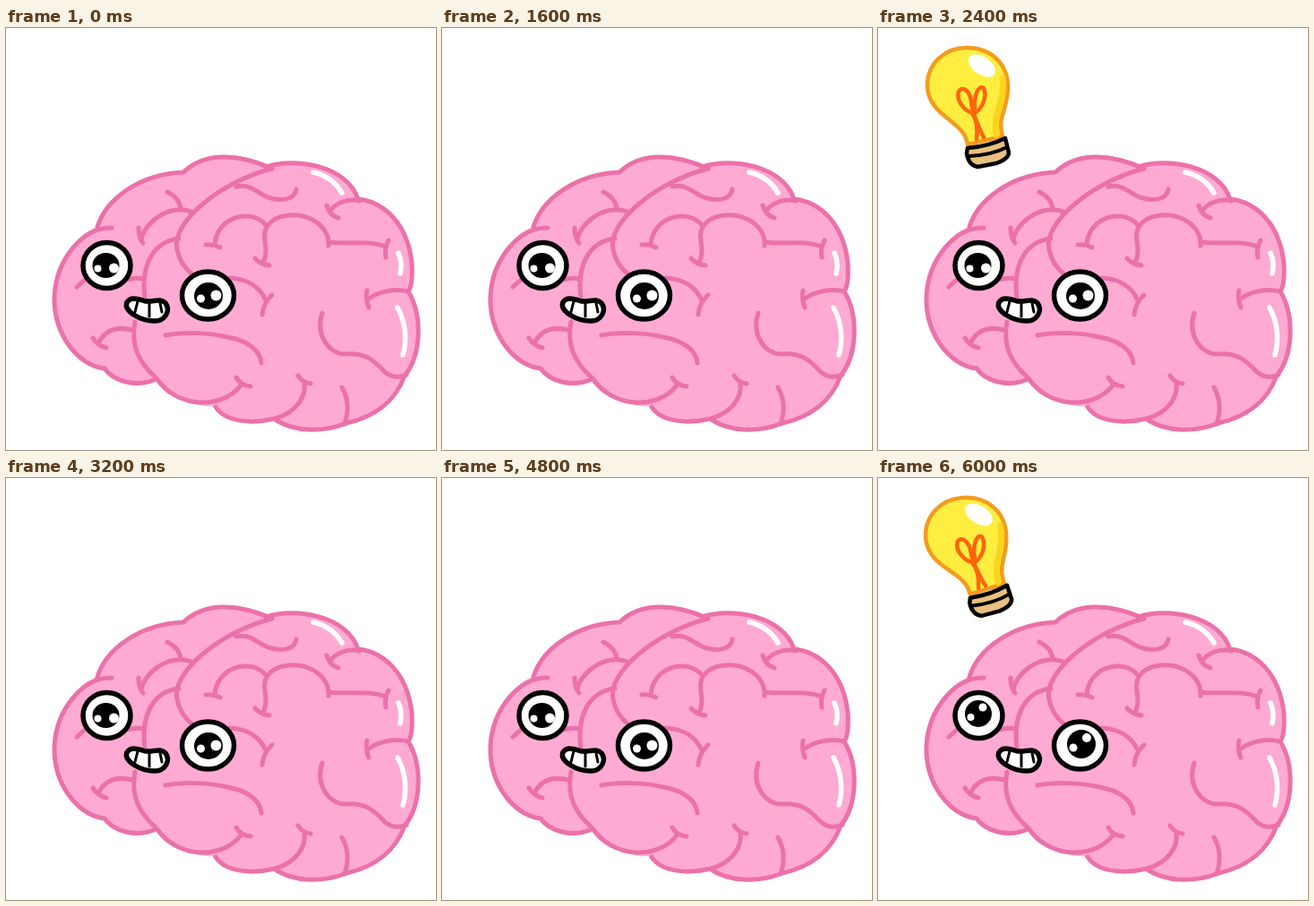
Animation, 480 px wide and 471 px high, one loop 6.4 s. Source, as an HTML page:

```html
<!DOCTYPE html>
<html lang="en">
<head>
<meta charset="utf-8">
<title>Bright idea</title>
<style>
html, body { margin: 0; width: 100%; height: 100%; overflow: hidden; background: #fff; }
svg { display: block; width: 480px; height: 471px; }
path, ellipse { stroke-linecap: round; stroke-linejoin: round; }
.skin { fill: #ffaad3; stroke: none; }
.fold { fill: none; stroke: #eb71a9; stroke-width: 5; }
.shine { fill: none; stroke: #fff; stroke-width: 5.5; }
.ink { fill: #fff; stroke: #000; stroke-width: 5.5; }
.tooth { fill: none; stroke: #000; stroke-width: 3; }
.glass { fill: #ffee3f; stroke: #f49b1e; stroke-width: 4.5; }
.shade { fill: none; stroke: #fdd51f; stroke-width: 7; }
.wire { fill: none; stroke: #ff650b; stroke-width: 4.5; }
.cap { fill: #e9c080; stroke: #000; stroke-width: 4.5; }
</style>
</head>
<body>
<svg viewBox="0 0 480 471">
  <g id="brain">
    <path class="skin" d="M102 222C112 190 150 163 198 161C220 140 255 136 297 154C325 143 380 153 393 191C422 194 448 218 453 262C454 280 453 289 449 294C465 320 464 365 445 388C435 416 412 434 380 441C350 453 320 449 300 437C270 443 245 440 234 422C205 424 184 408 168 391C145 402 120 393 110 380C80 375 52 340 54 300C57 255 85 226 102 222Z"/>
    <g class="fold">
      <path d="M102 222C112 190 150 163 198 161C220 140 255 138 297 157"/>
      <path d="M118 223C86 222 56 258 54 300C53 342 80 376 110 380C120 394 145 402 167 392"/>
      <path d="M297 157C238 172 184 218 191 247C194 261 200 268 208 275"/>
      <path d="M193 235C166 238 150 262 155 302"/>
      <path d="M144 328C139 355 148 373 168 391C190 424 240 427 262 399M257 390Q262 399 273 400"/>
      <path d="M290 155C322 144 380 153 393 191C422 194 448 218 453 262C454 280 453 289 449 294C465 320 464 365 445 388C435 416 412 434 380 441C350 453 320 449 302 438"/>
      <path d="M234 423C245 440 275 442 300 436C325 429 335 411 333 396M326 388Q331 396 340 397"/>
      <path d="M375 401C383 415 382 430 378 442"/>
      <path d="M353 318C345 342 360 364 379 364C400 362 410 370 422 383C429 390 439 391 447 387"/>
      <path d="M257 177C275 173 282 187 296 190C310 194 323 190 324 180"/>
      <path d="M358 198Q361 209 371 212M362 204C368 195 382 190 395 193"/>
      <path d="M233 241C235 222 250 210 268 210C278 210 285 214 290 220M223 242Q231 241 239 245M278 257Q284 264 294 265"/>
      <path d="M287 262C295 245 284 235 291 222C300 207 325 206 340 213C355 220 361 232 360 243M360 239C385 242 402 236 424 244M427 237Q422 246 424 256"/>
      <path d="M405 302C415 295 432 290 449 294M403 293Q401 302 405 312"/>
      <path d="M180 183Q194 190 195 202M151 237C153 219 180 196 207 205M148 223Q148 234 153 240"/>
      <path d="M104 350C112 336 125 333 141 337M97 346Q103 355 112 357"/>
      <path d="M79 289L88 281M136 281Q145 278 153 280"/>
      <path d="M250 279C268 280 283 288 290 304M297 298Q287 307 286 320"/>
      <path d="M178 343C198 339 228 340 247 345C270 349 284 360 285 374"/>
    </g>
    <path class="shine" d="M343 161C356 164 368 172 375 184M438 251Q443 262 440 274M437 312C446 328 448 348 443 365"/>
    <ellipse class="ink" cx="112.500" cy="265" rx="26.500" ry="25.500"/>
    <ellipse class="ink" cx="225.500" cy="298.500" rx="29" ry="26.500"/>
    <g id="ahead">
      <ellipse cx="111.500" cy="265" rx="15" ry="14"/>
      <ellipse cx="226" cy="299" rx="16" ry="15"/>
      <g fill="#fff">
        <circle cx="102.500" cy="268.500" r="4"/><circle cx="120.500" cy="268" r="5.500"/>
        <circle cx="217.500" cy="302" r="4.500"/><circle cx="234.500" cy="298.500" r="6"/>
      </g>
    </g>
    <g id="upward">
      <ellipse cx="112" cy="263" rx="15" ry="15"/>
      <ellipse cx="227" cy="297" rx="16" ry="16"/>
      <g fill="#fff">
        <circle cx="103.500" cy="267" r="4"/><circle cx="117" cy="256" r="4.500"/>
        <circle cx="218" cy="301" r="4.500"/><circle cx="233" cy="290" r="5"/>
      </g>
    </g>
    <path class="ink" d="M135 306C140 299 148 303 156 305C165 306 172 301 178 307C184 315 178 327 166 327C150 327 131 316 135 306Z"/>
    <path class="tooth" d="M147 305L144 317M160 307L160 322M172 307L174 317"/>
  </g>
  <g id="bulb">
    <path class="glass" d="M100 130C97 103 57 100 55 65C55 38 76 22 99 22C128 22 146 42 145 68C144 94 133 98 139 121Z"/>
    <path class="shade" d="M139 56C142 86 128 91 132 119"/>
    <ellipse cx="116" cy="42" rx="17" ry="10" fill="#fff" transform="rotate(36 116 42)"/>
    <path class="wire" d="M110 124C112 107 108 99 105 95C95 91 87 80 90 71C95 63 103 72 104 82C105 92 111 108 118 122M106 96C117 91 122 76 118 67C112 63 107 75 108 90"/>
    <path class="cap" d="M100 134Q124 132 142 123L146 139Q146 146 132 151L111 155Q101 153 99 140Z"/>
    <path d="M102 143Q126 142 144 133" fill="none" stroke="#000" stroke-width="4"/>
  </g>
</svg>
<script>
const STEP = 400;
const $ = id => document.getElementById(id);
const show = (id, on) => $(id).setAttribute("visibility", on ? "visible" : "hidden");

// wide: the swollen pose; tilt: bulb angle, null when off; up: glance at the bulb
const poses = [
  { wide: 0, tilt: null }, { wide: 1, tilt: null },
  { wide: 0, tilt: null }, { wide: 1, tilt: null },
  { wide: 0, tilt: null }, { wide: 1, tilt: 2 },
  { wide: 0, tilt: 0 },    { wide: 0, tilt: -4, up: true }
];

function draw({ wide, tilt, up }) {
  $("brain").setAttribute("transform",
    `translate(51 141) scale(${1 + wide * 0.006} ${1 + wide * 0.004}) translate(-51 -141)`);
  show("ahead", !up);
  show("upward", up);
  show("bulb", tilt !== null);
  $("bulb").setAttribute("transform", `rotate(${tilt || 0} 97 92)`);
}

const start = performance.now();
let last = -1;
function tick() {
  const i = Math.floor((performance.now() - start) / STEP) % poses.length;
  if (i !== last) draw(poses[last = i]);
  requestAnimationFrame(tick);
}
tick();
</script>
</body>
</html>
```
